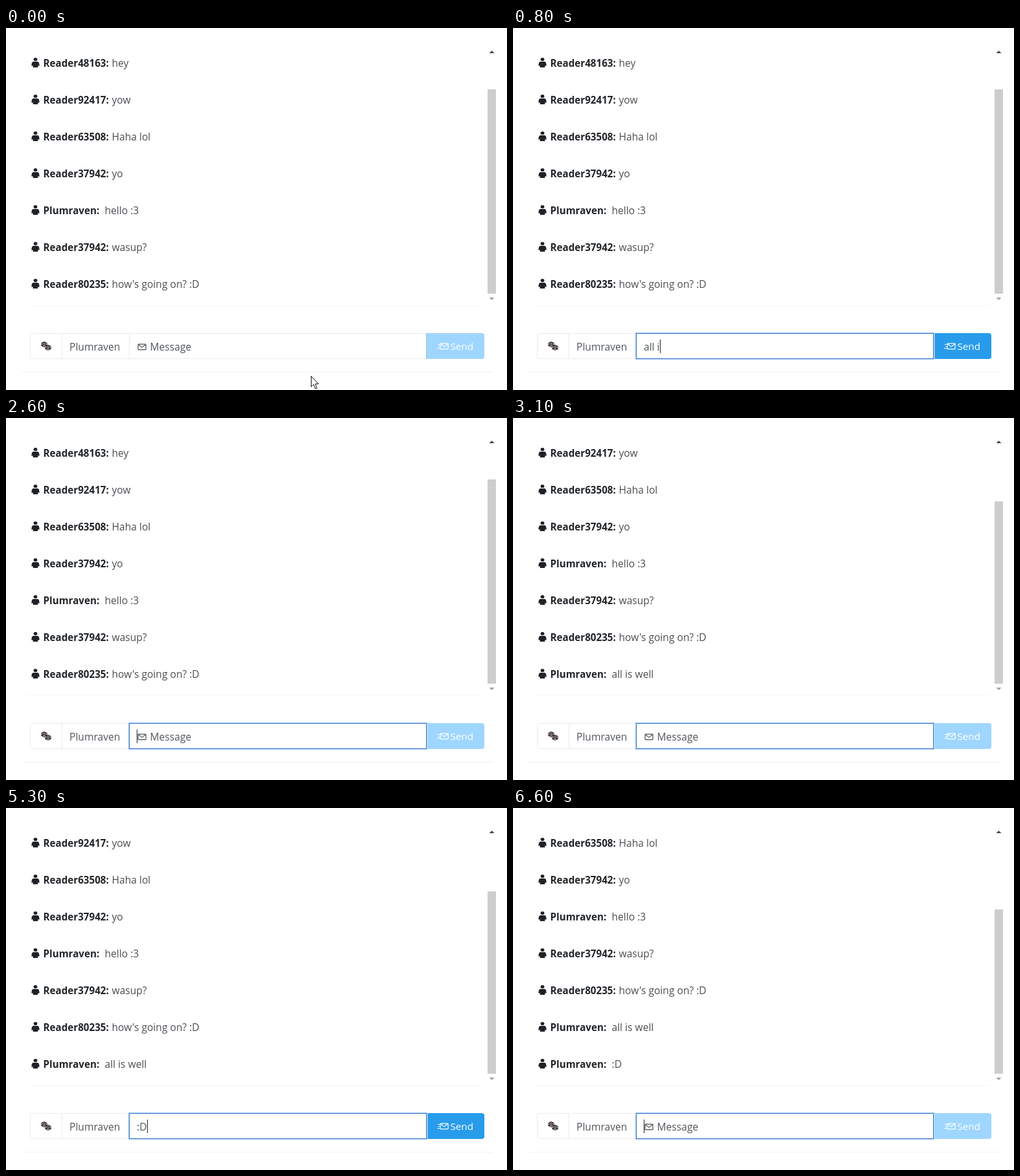
Animation of 774x560 px, one loop 7.2 s. Source, as an HTML page:

```html
<!DOCTYPE html>
<html lang="en">
<head>
<meta charset="utf-8">
<title>Chat</title>
<style>
  html, body { margin: 0; width: 100%; height: 100%; overflow: hidden; background: #fff; }
  svg { display: block; width: 774px; height: 560px; }
  text { font: 400 15.6px "Open Sans", "Noto Sans", sans-serif; fill: #4a4e52; white-space: pre; }
  .name { font-size: 15.2px; font-weight: 700; fill: #212529; }
  .field { fill: #50565c; }
  .send { font-size: 15.2px; font-weight: 500; fill: #fff; }
</style>
</head>
<body>
<svg viewBox="0 0 774 560" xmlns="http://www.w3.org/2000/svg">
  <defs>
    <g id="person" fill="#1f2226">
      <ellipse cx="45.5" cy="48.5" rx="2.9" ry="2.6"/>
      <path d="M42 52H49Q51 52.4 51.3 55L51.7 58.5H49.3V61H41.7V58.5H39.3L39.7 55Q40 52.4 42 52Z"/>
    </g>
    <g id="envelope" fill="none" stroke-width="1.2">
      <rect x=".6" y=".6" width="12" height="8.6" rx=".6"/>
      <path d="M1 1.2L6.6 5.6L12.2 1.2"/>
    </g>
    <g id="die">
      <path d="M0-4.5L4.6-2.4V2.2L0 4.5L-4.6 2.2V-2.4Z" fill="#21171b"/>
      <path d="M-4.6-2.4L0-.2L4.6-2.4M0-.2V4.5" fill="none" stroke="#d9cdd0" stroke-width=".8"/>
      <g fill="#fff">
        <circle cy="-2.5" r=".8"/>
        <circle cx="-3.3" r=".7"/><circle cx="-1.4" cy="2.2" r=".7"/>
        <circle cx="1.5" cy="2.2" r=".7"/><circle cx="3.2" r=".7"/>
      </g>
    </g>
  </defs>

  <rect width="774" height="560" fill="#fff"/>
  <g id="chat"></g>
  <path d="M746.5 39L750.5 35L754.5 39Z" fill="#484848"/>
  <path d="M746.5 417L750.5 421L754.5 417Z" fill="#a3a3a3"/>
  <rect id="thumb" x="744" width="13" fill="#cdcdcd"/>
  <path d="M33 429.5H736" stroke="#f7f7f7"/>
  <path d="M25 532.5H752" stroke="#f0f0f0"/>

  <rect x="37.5" y="472.5" width="701" height="39" rx="4" fill="#fff" stroke="#ebebeb"/>
  <path d="M86.5 473V511M190.5 473V511" stroke="#ebebeb"/>
  <use href="#die" x="59" y="489.5"/>
  <use href="#die" x="65" y="494.5"/>
  <text class="field" x="98" y="499">Plumraven</text>

  <path id="button" d="M649 472H735Q739 472 739 476V508Q739 512 735 512H649Z"/>
  <path id="edge" d="M649.5 472V512" stroke="#8fbfe2"/>
  <use href="#envelope" x="670.5" y="487.5" stroke="#fff"/>
  <path d="M667 489.5H670M668 492.5H670M666 495.5H670" stroke="#fff"/>
  <text class="send" x="686.5" y="498">Send</text>

  <g id="ring" fill="none">
    <rect x="190" y="472" width="460" height="40" stroke="#c3dcfa" stroke-width="3"/>
    <rect x="190.5" y="472.5" width="459" height="39" fill="#fff" stroke="#2f6cc0"/>
  </g>
  <g id="placeholder">
    <use href="#envelope" x="203.5" y="488.5" stroke="#495057"/>
    <text class="field" x="222.5" y="499">Message</text>
  </g>
  <text id="typed" class="field" x="202" y="499"></text>
  <rect id="caret" y="482" width="1" height="21" fill="#222"/>
  <path id="pointer" d="M471.5 538.5V555L475.3 551.4L478 558L480.5 557L477.8 550.6H482.8Z" fill="#fff" stroke="#111"/>
</svg>

<script>
const LOOP = 7200, ROW = 57, VISIBLE = 7;
const ME = "Plumraven";
const messages = [
  ["Reader48163", "hey"],
  ["Reader92417", "yow"],
  ["Reader63508", "Haha lol"],
  ["Reader37942", "yo"],
  [ME, "hello :3"],
  ["Reader37942", "wasup?"],
  ["Reader80235", "how's going on? :D"],
  [ME, "all is well"],
  [ME, ":D"]
];
const thumbTops = [95, 129, 157];
const buttonColors = ["#9fd6ff", "#61b8f5", "#289ceb"];

// Each step changes only the listed parts of the state.
const steps = [
  [0, { text: "", caret: false, button: 0, scroll: 0, focus: 0 }],
  [100, { focus: .6, caret: true }],
  [200, { focus: 1 }],
  [400, { caret: false }],
  [800, { text: "all i", caret: true, button: 2 }],
  [1300, { text: "all is" }],
  [1500, { text: "all is " }],
  [1700, { text: "all is w" }],
  [2000, { text: "all is we" }],
  [2100, { text: "all is wel" }],
  [2200, { text: "all is well" }],
  [2500, { text: "", button: 1 }],
  [2600, { button: 0 }],
  [3000, { scroll: 1, caret: false }],
  [3700, { caret: true }],
  [4400, { caret: false }],
  [5000, { text: ":", caret: true, button: 1 }],
  [5100, { button: 2 }],
  [5300, { text: ":D" }],
  [5600, { text: "", button: 1 }],
  [5700, { button: 0, scroll: 2 }],
  [6000, { caret: false }],
  [6600, { caret: true }]
];

const $ = id => document.getElementById(id);
const show = (el, on) => el.setAttribute("display", on ? "inline" : "none");

$("chat").innerHTML = messages.map(([name, text], i) => `
  <g transform="translate(0 ${i * ROW})">
    <use href="#person"/>
    <text class="name" x="57.5" y="60">${name}:</text>
    <text x="${name === ME ? 152.5 : 163.5}" y="60">${text}</text>
  </g>`).join("");
const rows = [...$("chat").children];

function stateAt(time) {
  const state = {};
  for (const [start, change] of steps) if (start <= time) Object.assign(state, change);
  return state;
}

function render(time) {
  const { text, caret, button, scroll, focus } = stateAt(time);
  $("chat").setAttribute("transform", `translate(0 ${-scroll * ROW})`);
  rows.forEach((row, i) => show(row, i >= scroll && i < scroll + VISIBLE));
  $("thumb").setAttribute("y", thumbTops[scroll]);
  $("thumb").setAttribute("height", 411 - thumbTops[scroll]);
  $("button").setAttribute("fill", buttonColors[button]);
  $("ring").setAttribute("opacity", focus);
  show($("edge"), !focus);
  show($("pointer"), !focus);
  show($("placeholder"), !text);
  $("typed").textContent = text;
  show($("caret"), caret);
  const width = text ? $("typed").getComputedTextLength() : 0;
  $("caret").setAttribute("x", 202 + Math.ceil(width));
}

const begin = performance.now();
function tick() {
  render((performance.now() - begin) % LOOP);
  requestAnimationFrame(tick);
}
tick();
</script>
</body>
</html>
```
